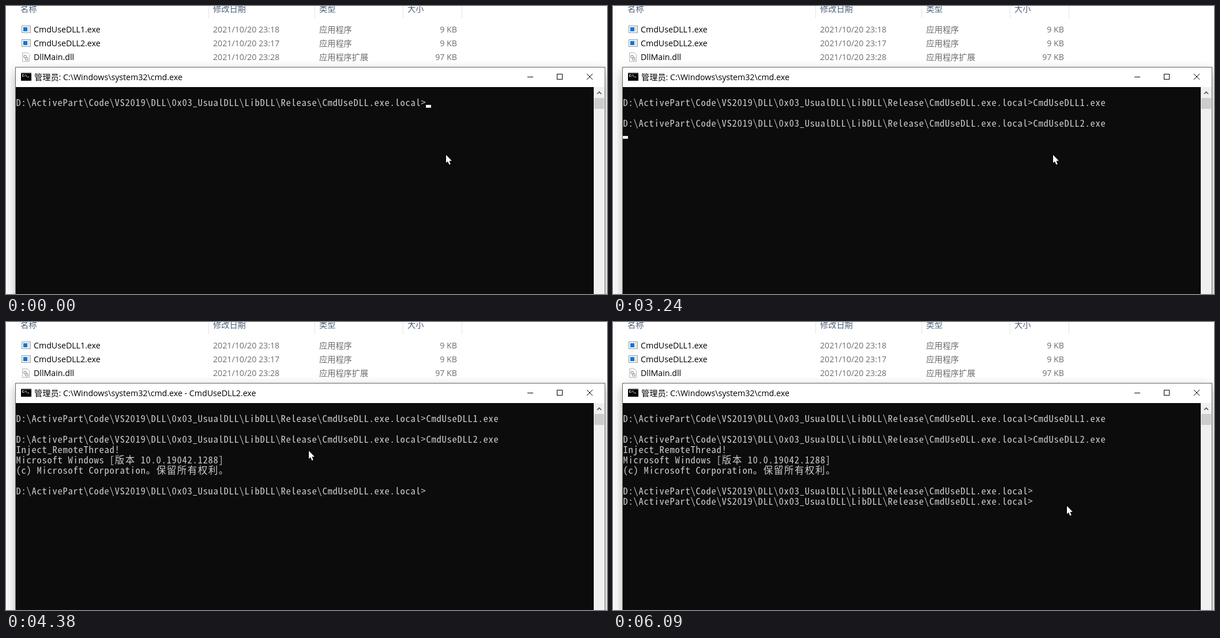
Animation, 1042 px wide and 501 px high, one loop 7660 ms. Source, as an HTML page with a canvas:

```html
<!DOCTYPE html>
<html lang="zh">
<head>
<meta charset="utf-8">
<title>Console</title>
<style>
html, body { margin: 0; width: 100%; height: 100%; overflow: hidden; background: #fff; }
canvas { display: block; }
</style>
</head>
<body>
<canvas id="stage" width="1042" height="501"></canvas>
<script>
const ctx = document.getElementById('stage').getContext('2d');
const LOOP = 7660, TICK = 70, TICK_PHASE = 40;
const UI = '14.2px "Open Sans", "Noto Sans CJK SC", sans-serif';
const MONO = '16.5px "Noto Sans Mono CJK SC", "Noto Sans Mono", "Liberation Mono", monospace';
const CELL = 9, LINE = 18, LEFT = 17, TOP = 141;
const PROMPT = 'D:\\ActivePart\\Code\\VS2019\\DLL\\0x03_UsualDLL\\LibDLL\\Release\\CmdUseDLL.exe.local>';
const FIRST = 'CmdUseDLL1.exe', SECOND = 'CmdUseDLL2.exe';
const STARTED = 3310, STOPPED = 4450;

// The console session; the text cursor follows the latest line.
const SESSION = [
  { at: 0, row: 1, text: PROMPT },
  { at: 330, row: 1, text: PROMPT + FIRST },
  { at: 1130, row: 3, text: PROMPT },
  { at: 2520, row: 3, text: PROMPT + FIRST },
  { at: 2780, row: 3, text: PROMPT + SECOND },
  { at: 3240, row: 4, text: '' },
  { at: STARTED, row: 4, text: 'Inject_RemoteThread!' },
  { at: STARTED, row: 5, text: 'Microsoft Windows [版本 10.0.19042.1288]' },
  { at: STARTED, row: 6, text: '(c) Microsoft Corporation。保留所有权利。' },
  { at: STARTED, row: 8, text: PROMPT },
  { at: STOPPED, row: 9, text: PROMPT }
];

// Times at which the text cursor switches off, on, off, ...
const BLINKS = [330, 400, 1660, 2120, 3900, STOPPED, 4730, 5080, 5560];

// Corners of the mouse path: time, x, y.
const PATH = [
  [3830, 763, 259], [4100, 427, 106], [4660, 622, 342], [4870, 688, 314], [5080, 743, 298],
  [5360, 711, 322], [5500, 717, 323], [5760, 756, 321], [5990, 756, 321], [6060, 787, 320]
];

function rect(x, y, w, h, color) {
  ctx.fillStyle = color;
  ctx.fillRect(x, y, w, h);
}

function box(x, y, w, h, color) {
  ctx.strokeStyle = color;
  ctx.lineWidth = 1;
  ctx.strokeRect(x + .5, y + .5, w - 1, h - 1);
}

function label(text, x, y, color, align = 'left') {
  ctx.font = UI;
  ctx.textAlign = align;
  ctx.fillStyle = color;
  ctx.fillText(text, x, y);
}

function line(points, color, width = 1, closed = false) {
  ctx.beginPath();
  points.forEach(([x, y]) => ctx.lineTo(x, y));
  if (closed) ctx.closePath();
  ctx.strokeStyle = color;
  ctx.lineWidth = width;
  ctx.stroke();
}

function programIcon(x, y) {
  rect(x, y, 16, 13, '#f4f6f8');
  box(x, y, 16, 13, '#929ba3');
  rect(x + 3, y + 3, 7, 7, '#0878d4');
  for (let i = 0; i < 3; i++) rect(x + 11, y + 3 + i * 3, 3, 1, '#b4bcc4');
}

function libraryIcon(x, y) {
  line([[x + .5, y + .5], [x + 9.5, y + .5], [x + 12.5, y + 3.5], [x + 12.5, y + 15.5], [x + .5, y + 15.5]], '#b4b4b4', 1, true);
  for (const [dx, dy] of [[5, 7], [8, 11]]) {
    ctx.beginPath();
    ctx.arc(x + dx, y + dy, 2.2, 0, 7);
    ctx.strokeStyle = '#a4a8ac';
    ctx.lineWidth = 1.4;
    ctx.stroke();
  }
}

function consoleIcon(x, y) {
  rect(x, y, 18, 15, '#000');
  rect(x, y, 18, 2, '#b8bcc0');
  line([[x + 5, y + 4.5], [x + 2.5, y + 4.5], [x + 2.5, y + 7.5], [x + 5, y + 7.5]], '#ddd');
  rect(x + 6, y + 5, 1, 1, '#ddd');
  rect(x + 6, y + 7, 1, 1, '#ddd');
  line([[x + 8, y + 4], [x + 10, y + 8]], '#ddd');
  rect(x + 11, y + 8, 3, 1, '#ddd');
}

function explorer() {
  rect(0, 0, 1042, 501, '#fff');
  rect(3, 0, 1, 501, '#f5f5f5');
  ['名称', '修改日期', '类型', '大小'].forEach((text, i) => {
    const x = [25, 359, 543, 696][i];
    label(text, x, 10, '#4c607a');
    if (i) rect(x - 8, 0, 1, 21, '#e5e5e5');
  });
  rect(790, 0, 1, 21, '#e5e5e5');
  [
    [FIRST, '23:18', '应用程序', '9 KB'],
    [SECOND, '23:17', '应用程序', '9 KB'],
    ['DllMain.dll', '23:28', '应用程序扩展', '97 KB']
  ].forEach(([name, time, type, size], i) => {
    const y = 46 + i * 24;
    if (i < 2) programIcon(27, y - 12); else libraryIcon(28, y - 13);
    label(name, 48, y, '#000');
    label('2021/10/20 ' + time, 359, y, '#6d6d6d');
    label(type, 543, y, '#6d6d6d');
    label(size, 782, y, '#6d6d6d', 'right');
  });
}

function consoleFrame(title) {
  ctx.save();
  ctx.shadowColor = 'rgba(0,0,0,.3)';
  ctx.shadowBlur = 18;
  ctx.shadowOffsetY = 7;
  rect(16, 106, 1023, 420, '#666');
  ctx.restore();
  rect(17, 107, 1021, 34, '#fff');
  rect(17, TOP, 1002, 360, '#0c0c0c');
  rect(1019, TOP, 19, 360, '#f0f0f0');
  rect(1020, 160, 17, 19, '#cdcdcd');
  line([[1025, 153], [1028.5, 149.5], [1032, 153]], '#505050', 1.6);
  consoleIcon(26, 115);
  label(title, 49, 129, '#000');
  rect(904, 123, 10, 1, '#000');
  box(955, 118, 10, 10, '#000');
  line([[1007, 118], [1017, 128]], '#000');
  line([[1017, 118], [1007, 128]], '#000');
}

// Wide characters take two cells of the console grid. Returns the end of the text.
function print(row, text) {
  ctx.font = MONO;
  ctx.textAlign = 'center';
  ctx.fillStyle = '#ccc';
  let x = LEFT;
  for (const ch of text) {
    const w = ch > '\u2e80' ? CELL * 2 : CELL;
    ctx.fillText(ch, x + w / 2, TOP + row * LINE + 15);
    x += w;
  }
  return x;
}

function session(t) {
  const rows = new Map(SESSION.filter(step => t >= step.at).map(step => [step.row, step.text]));
  let x, last;
  for (const [row, text] of rows) {
    x = print(row, text);
    last = row;
  }
  const visible = BLINKS.filter(at => t >= at).length % 2 === 0;
  if (visible) rect(x, TOP + last * LINE + 13, CELL, 5, '#f2f2f2');
}

function mousePosition(t) {
  const now = t - (t - TICK_PHASE) % TICK;
  const next = PATH.findIndex(([at]) => at > now);
  if (next <= 0) return PATH.at(next).slice(1);
  const [t0, x0, y0] = PATH[next - 1], [t1, x1, y1] = PATH[next];
  const k = (now - t0) / (t1 - t0);
  return [x0 + (x1 - x0) * k, y0 + (y1 - y0) * k].map(Math.round);
}

function shape(x, y, points) {
  ctx.save();
  ctx.translate(x, y);
  line(points, '#000', 2, true);
  ctx.fillStyle = '#fff';
  ctx.fill();
  ctx.restore();
}

function mouse(t) {
  const [x, y] = mousePosition(t);
  if (y < 110) {
    const half = [[0, -10.5], [3.5, -6.5], [1, -6.5], [1, 6.5], [3.5, 6.5], [0, 10.5]];
    shape(x - .5, y + .5, [...half, ...half.slice(1, -1).reverse().map(([a, b]) => [-a, b])]);
  } else {
    shape(x, y, [[0, 0], [0, 14], [3, 11.3], [5.4, 17], [7.8, 16], [5.5, 10.5], [10, 10.2]]);
  }
}

function draw() {
  const t = performance.now() % LOOP;
  const running = t >= STARTED && t < STOPPED;
  explorer();
  consoleFrame('管理员: C:\\Windows\\system32\\cmd.exe' + (running ? ' - ' + SECOND : ''));
  session(t);
  mouse(t);
  requestAnimationFrame(draw);
}
draw();
</script>
</body>
</html>
```
